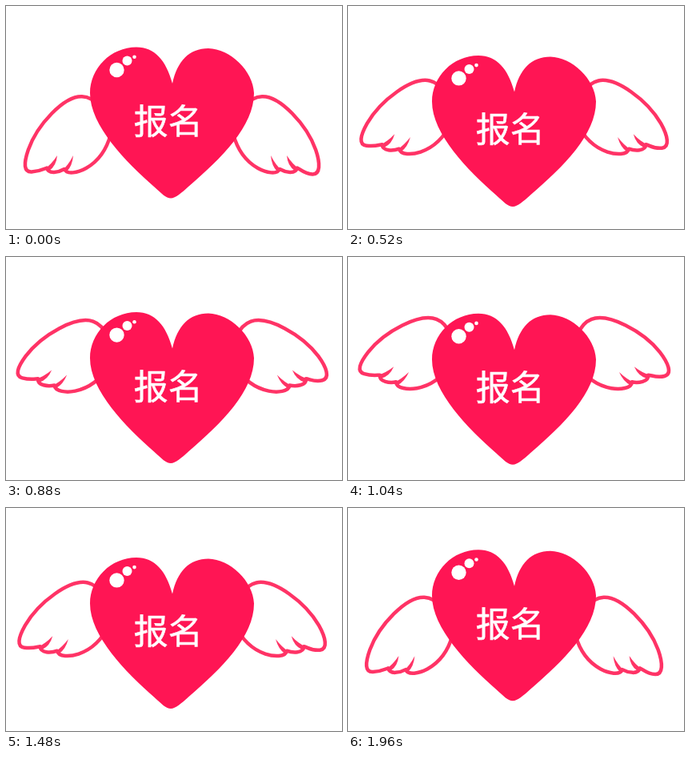
Animation, 420 px wide and 279 px high, one loop 2000 ms. Source, as an HTML page with a canvas:

```html
<!DOCTYPE html>
<html lang="zh">
<head>
<meta charset="utf-8">
<title>报名</title>
<style>
  html, body { margin: 0; width: 100%; height: 100%; overflow: hidden; background: #fff; }
  canvas { display: block; }
</style>
</head>
<body>
<canvas id="stage" width="420" height="279"></canvas>
<script>
const ctx = document.getElementById('stage').getContext('2d');
const LOOP = 2000, STEP = 40;
const DROP = 20, SWING = 20 * Math.PI / 180;
const AXIS = 207.5, PIVOT_Y = 142;
const RED = '#ff1554', PINK = '#ff3366';

const heart = new Path2D(
  'M208 97 C200 68 186 51.5 163 51.5 C131 51.5 105 78 105 109' +
  'C105 150 150 195 185 226 C195 235 200 240.5 206 240.5' +
  'C212 240.5 219 234 228 226 C270 190 310 150 310 109' +
  'C309 81 280 53.5 253 53 C229 53 214 69 208 97 Z');

// sag: how far the longest feather hangs down
const wing = sag => new Path2D(
  'M130 150 C125 132 112 114 95 113.3 C72.5 112.5 39 148.5 27.8 180' +
  `C22 197 22 ${207 + sag} 32 ${206.5 + sag}` +
  `C42 ${206 + sag} 47 204 51 202.5` +
  'C53 211 66 208 73 204 C76 211.5 90 208.5 100 203' +
  'C116 194 126 179 131 160 Z');
const leftWing = wing(1), rightWing = wing(4);

// tapered lines between the feathers
const barbs = new Path2D(
  'M48 204 Q57 198 64 187 Q63 200 54 206 Z' +
  'M70 206 Q78 199 84 187 Q83 200 76 207 Z');

const bubbles = [[138.5, 80, 9.2], [151.5, 68.5, 6], [160.5, 63.7, 2.3]];

function drawWing(shape, side, angle) {
  ctx.save();
  ctx.translate(AXIS, PIVOT_Y);
  ctx.scale(side, 1);
  ctx.rotate(angle);
  ctx.translate(-AXIS, -PIVOT_Y);
  ctx.fillStyle = '#fff';
  ctx.fill(shape);
  ctx.strokeStyle = ctx.fillStyle = PINK;
  ctx.lineWidth = 4.5;
  ctx.lineJoin = 'round';
  ctx.stroke(shape);
  ctx.fill(barbs);
  ctx.restore();
}

function drawLabel(text, x, y) {
  ctx.font = '43px "Noto Sans CJK SC", "Noto Sans CJK", sans-serif';
  ctx.textAlign = 'center';
  ctx.textBaseline = 'alphabetic';
  const m = ctx.measureText(text);
  const shift = (m.actualBoundingBoxAscent - m.actualBoundingBoxDescent) / 2;
  ctx.fillText(text, x, y + shift);
  ctx.strokeStyle = ctx.fillStyle;
  ctx.lineWidth = 0.6;
  ctx.strokeText(text, x, y + shift);
}

function drawHeart(dy) {
  ctx.save();
  ctx.translate(0, dy);
  ctx.fillStyle = RED;
  ctx.fill(heart);
  ctx.fillStyle = '#fff';
  for (const [x, y, r] of bubbles) {
    ctx.beginPath();
    ctx.arc(x, y, r, 0, Math.PI * 2);
    ctx.fill();
  }
  drawLabel('报名', 202.7, 144);
  ctx.restore();
}

function draw(time) {
  const t = Math.floor((time % LOOP) / STEP) * STEP;
  const k = 1 - Math.abs(t / (LOOP / 2) - 1);
  ctx.fillStyle = '#fff';
  ctx.fillRect(0, 0, 420, 279);
  drawWing(leftWing, 1, SWING * k);
  drawWing(rightWing, -1, SWING * k);
  drawHeart(DROP * k);
}

const start = performance.now();
function tick() {
  draw(performance.now() - start);
  requestAnimationFrame(tick);
}
tick();
</script>
</body>
</html>
```
